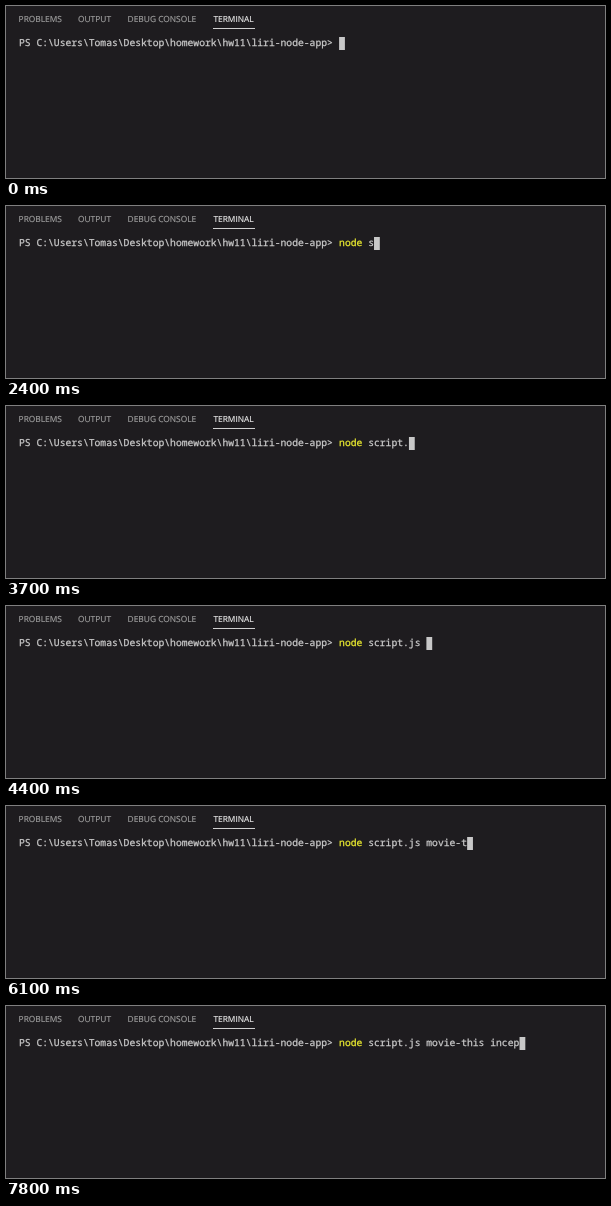
These frames come from a looping animation (599 by 172 pixels, 8000 ms). An HTML page:

```html
<!DOCTYPE html>
<html lang="en">
<head>
<meta charset="utf-8">
<title>Terminal</title>
<style>
  html, body { margin: 0; width: 100%; height: 100%; overflow: hidden; background: #1e1c1f; }
  svg { display: block; width: 599px; height: 172px; }
  text { text-rendering: geometricPrecision; white-space: pre; fill: var(--ink); stroke: var(--ink); }
  .tabs { font: 8.4px "Open Sans", "Noto Sans", sans-serif; stroke-width: 0.15px; --ink: #a0a0a0; }
  .tabs .on { --ink: #ececec; }
  .term { font: 9.7px "Noto Sans Mono", "DejaVu Sans Mono", monospace; stroke-width: 0.25px; --ink: #cccccc; }
  .term .cmd { --ink: #eeee30; }
</style>
</head>
<body>
<svg viewBox="0 0 599 172" xmlns="http://www.w3.org/2000/svg">
  <rect width="599" height="172" fill="#1e1c1f"/>
  <g class="tabs">
    <text x="12.6" y="16">PROBLEMS</text>
    <text x="72" y="16">OUTPUT</text>
    <text x="121.6" y="16">DEBUG CONSOLE</text>
    <text class="on" x="207.4" y="16">TERMINAL</text>
  </g>
  <rect x="207" y="22" width="42" height="1" fill="#d0d0d0"/>
  <g class="term">
    <text id="prompt" y="40"></text>
    <text id="cmd" class="cmd" y="40"></text>
    <text id="args" y="40"></text>
  </g>
  <rect id="cursor" y="31" width="5.8" height="13" fill="#c8c8c8"/>
</svg>
<script>
  const LOOP = 8000, LEFT = 13, CELL = 5.82;
  const PROMPT = "PS C:\\Users\\Tomas\\Desktop\\homework\\hw11\\liri-node-app> ";
  const LINE = "node script.js movie-this incep";
  const CMD_LEN = 4;
  // Time of each keystroke, in ms
  const KEYS = [
    1200, 1700, 1800, 1900, 2100,
    2400, 2600, 2800, 2900, 3100, 3200, 3700, 4100, 4300, 4400,
    4700, 5000, 5100, 5300, 5400, 5900, 6100, 6300, 6500, 6600, 6800,
    7100, 7400, 7500, 7700, 7800
  ];

  const el = id => document.getElementById(id);
  const colX = col => LEFT + col * CELL;
  const cmd = el("cmd"), args = el("args"), cursor = el("cursor");

  el("prompt").textContent = PROMPT;
  el("prompt").setAttribute("x", colX(0));
  cmd.setAttribute("x", colX(PROMPT.length));
  args.setAttribute("x", colX(PROMPT.length + CMD_LEN + 1));

  let shown = -1;
  function draw(ms) {
    const typed = KEYS.filter(k => k <= ms).length;
    if (typed === shown) return;
    shown = typed;
    const text = LINE.slice(0, typed);
    cmd.textContent = text.slice(0, CMD_LEN);
    args.textContent = text.slice(CMD_LEN + 1);
    cursor.setAttribute("x", colX(PROMPT.length + typed));
  }

  const start = performance.now();
  function tick() {
    draw((performance.now() - start) % LOOP);
    requestAnimationFrame(tick);
  }
  draw(0);
  requestAnimationFrame(tick);
</script>
</body>
</html>
```
